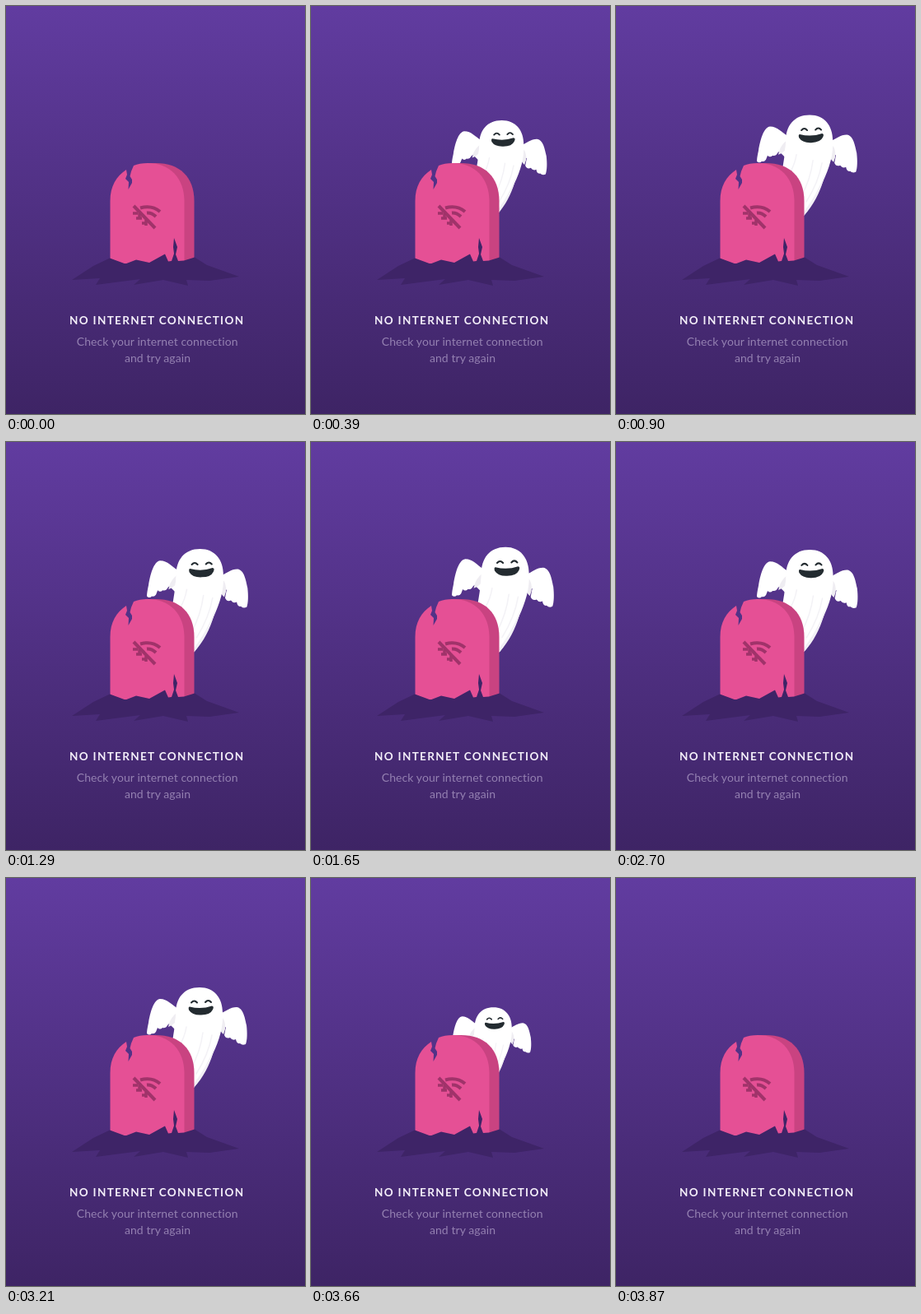
Recreate the animation shown at these times as an HTML page. Size 363 by 496 pixels, loop 4.53 s.

```html
<!DOCTYPE html>
<html lang="en">
<head>
<meta charset="utf-8">
<title>No internet connection</title>
<style>
  html, body { margin: 0; width: 100%; height: 100%; overflow: hidden; background: #3e2465; }
  svg { display: block; width: 363px; height: 496px; }
  text { font-family: Lato, sans-serif; text-anchor: middle; }
  .title { font-size: 13.5px; font-weight: 700; letter-spacing: 1.34px; fill: #f3eef9; }
  .hint { font-size: 14px; letter-spacing: .08px; fill: #9480b1; }
  .line { fill: none; stroke-linecap: round; }
</style>
</head>
<body>
<svg viewBox="0 0 363 496">
  <defs>
    <linearGradient id="sky" x2="0" y2="1">
      <stop stop-color="#613ca0"/>
      <stop offset="1" stop-color="#3e2465"/>
    </linearGradient>
  </defs>
  <rect width="363" height="496" fill="url(#sky)"/>

  <g id="ghost" fill="#fff">
    <path d="M209 159C201 154 196 147 187 147C179 148 175 164 173 176Q171 185 171 189Q174 192 177 189Q180 190 182 187L184 182Q187 185 190 182Q194 183 196 179L198 177L207 186Z"/>
    <path d="M260 165C267 162 272 157 280 157C288 158 290 170 292 179C293 188 293 197 291 202Q287 204 284 201Q280 202 279 196Q275 198 272 194Q267 196 265 191L267 181L255 191Z"/>
    <path fill="#efedf2" d="M207 164Q200 170 198 177L197 181Q201 180 205 176ZM262 169Q267 174 266 184L264 190Q260 187 259 181Z"/>
    <path d="M206 165C206 146 216 133 235 133C253 133 263 146 263 164C264 181 259 197 251 214C244 231 236 245 228 255L190 280C188 250 205 200 206 165Z"/>
    <path class="line" stroke="#f3f2f6" stroke-width="1.5" d="M219 181Q217 193 211 203M239 188Q236 211 225 231M250 191Q246 214 231 238"/>
    <path fill="#f2f0f5" d="M258 190C252 211 242 232 228 250V255C240 242 247 227 251 214Z"/>
    <path class="line" stroke="#232b30" stroke-width="2" d="M225 151.500Q228.500 147.500 232 151.500M242 151Q245.500 147 249 151"/>
    <path fill="#232b30" d="M223 156.500Q237 160 250 155.500Q253 156 251 160Q248 166.500 237 166.500Q226 167 222 160.500Q221 156.500 223 156.500Z"/>
  </g>

  <path fill="#c94381" d="M172 191H182C211 191 228.500 208 228.500 237V311H200Z"/>
  <path fill="#e55095" d="M126.500 313V237C126.500 219 134 207 146 199L147 205L145 210L149 214L148.500 223L153 215L153 211L150.500 207L152 201L155 194Q162 191 172 191C199 191 216.500 209 216.500 237V313Z"/>

  <g fill="none" stroke="#a0336a" stroke-width="4">
    <path d="M155 243L181 270"/>
    <path d="M163 245.500Q177 241.500 187 250M171 251.500Q177 251 182 256"/>
    <path d="M154 252H160M158 258H165M165 264H171M162 252V259M170 260V267" stroke-width="3.500"/>
  </g>

  <path fill="#3e2467" d="M80 333L106 316L126 306.500L145 313.500L158 308.500L174 312L193 301.500L197 310.500L201 310L204 301L203 293L204 282L208 293L206 302L209 310L216 309.500L229 305.500L244 315L283 329L247 334L219 333L221 340L191 333L155 339L163 332L109 339L114 331Z"/>

  <text class="title" x="183.200" y="387">NO INTERNET CONNECTION</text>
  <text class="hint" x="183.700" y="413">Check your internet connection</text>
  <text class="hint" x="184" y="433">and try again</text>
</svg>
<script>
  const LOOP = 4530, ENTER = 120, SETTLED = 640, LEAVE = 3330, GONE = 3870, HIDDEN = 0.45;
  const ghost = document.getElementById("ghost");
  const clamp = v => Math.min(1, Math.max(0, v));
  const progress = (t, from, to) => clamp((t - from) / (to - from));

  function draw(now) {
    const t = now % LOOP;
    const rise = 1 - (1 - progress(t, ENTER - 30, SETTLED)) ** 3;
    const sink = progress(t, LEAVE, GONE) ** 2;
    const size = HIDDEN + (1 - HIDDEN) * (rise - sink);
    const hover = 0.5 - 0.5 * Math.cos(2 * Math.PI * progress(t, 660, 3180));

    // The ghost grows out of a point behind the stone and stretches a little as it hovers.
    const sx = size * (1 + 0.02 * hover), sy = size * (1 + 0.051 * hover);
    ghost.setAttribute("transform", `translate(170 250) scale(${sx} ${sy}) translate(-170 -250)`);
    ghost.setAttribute("visibility", t >= ENTER && t < GONE ? "visible" : "hidden");
  }

  const start = performance.now();
  function tick() {
    draw(performance.now() - start);
    requestAnimationFrame(tick);
  }
  tick();
</script>
</body>
</html>
```
